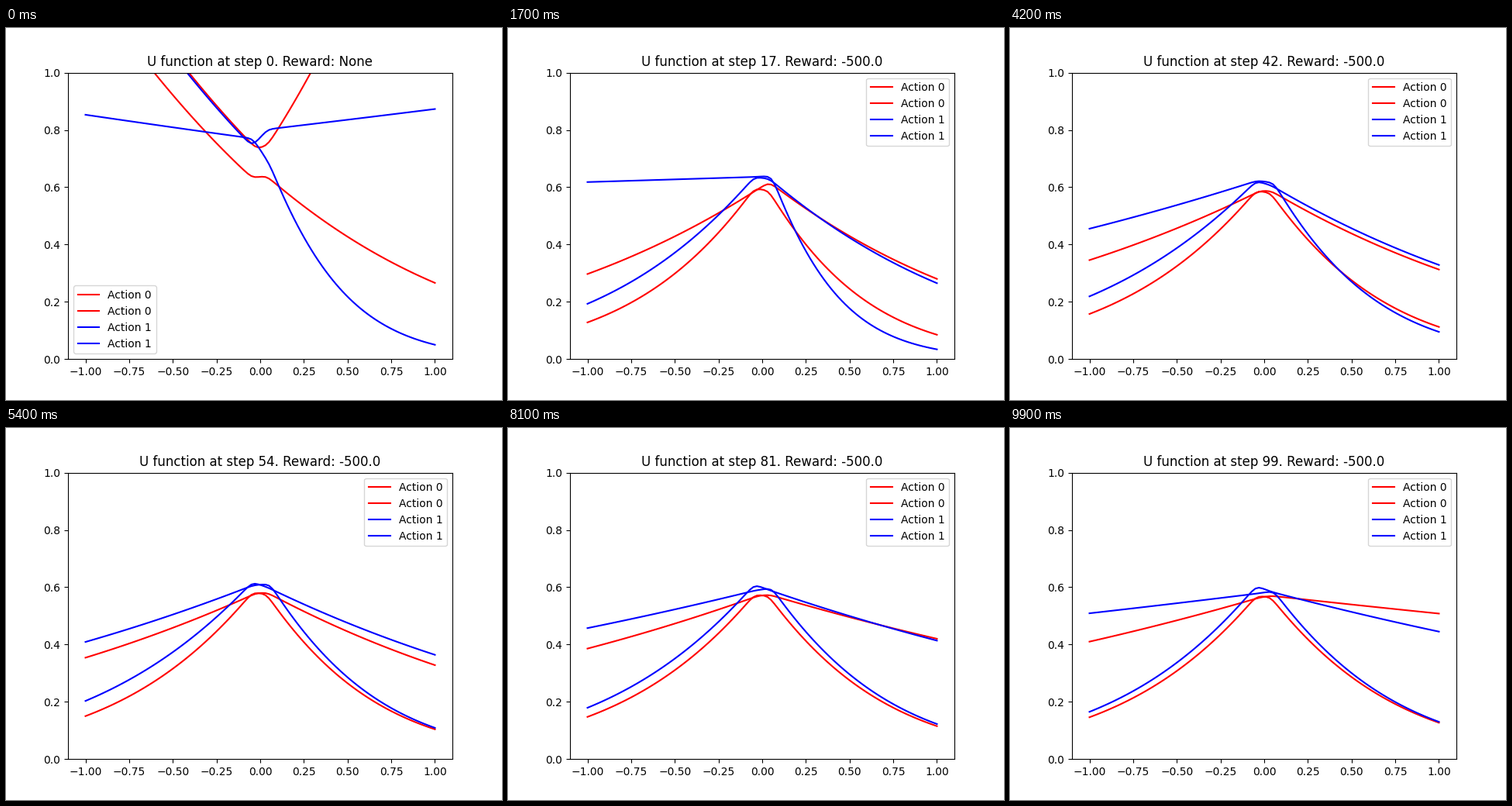
Animation, 640 px wide and 480 px high, one loop 10 s. Source, as a matplotlib script:

```python
import numpy as np
import matplotlib.pyplot as plt
from matplotlib.animation import FuncAnimation

FRAMES = 100
POSE_STEPS = [0, 17, 27, 54, 99]
DIP_STEP = 8      # early training overshoots until here, then recovers
ROUNDING = 0.012  # softness of the corners

x = np.linspace(-1, 1, 100)

# Each curve is a bent line under a softplus: two corner positions, then per
# pose the heights at x = -1, at both corners and at x = 1.
CURVES = [
    ("Action 0", "r", (-.045, .035),
     [(1.32, .632, .64, .266), (.128, .596, .59, .085), (.167, .595, .587, .125),
      (.15, .582, .577, .104), (.146, .569, .567, .127)]),
    ("Action 0", "r", (-.02, .04),
     [(1.5, .733, .745, 1.95), (.297, .595, .618, .28), (.333, .596, .599, .297),
      (.354, .58, .581, .328), (.41, .565, .57, .508)]),
    ("Action 1", "b", (-.04, .055),
     [(.853, .77, .68, .05), (.618, .636, .64, .034), (.566, .638, .622, .068),
      (.409, .607, .612, .109), (.509, .578, .587, .13)]),
    ("Action 1", "b", (-.045, .04),
     [(1.49, .742, .802, .873), (.193, .636, .63, .265), (.233, .629, .617, .284),
      (.203, .618, .6, .364), (.165, .605, .584, .445)]),
]


def softplus(z):
    return np.logaddexp(0, z)


def inverse(y):
    return np.log(np.expm1(y))


def ease(t, z):
    """Smooth values for every step; flat wherever a value turns around."""
    d = np.diff(z, axis=0) / np.diff(t)[:, None]
    a, b = d[:-1], d[1:]
    same = a * b > 0
    inner = np.where(same, 2 * a * b / np.where(same, a + b, 1), 0)
    m = np.vstack([d[:1], inner, d[-1:]])

    step = np.arange(FRAMES)
    i = np.clip(np.searchsorted(t, step, side="right") - 1, 0, len(t) - 2)
    h = (t[i + 1] - t[i])[:, None]
    s = (step - t[i])[:, None] / h
    return ((1 + 2 * s) * (1 - s) ** 2 * z[i] + s * s * (3 - 2 * s) * z[i + 1]
            + h * s * (1 - s) ** 2 * m[i] + h * s * s * (s - 1) * m[i + 1])


def bend(k):
    """Rounded hinge: zero left of k, slope one right of it."""
    return ROUNDING * softplus((x - k) / ROUNDING)


def track(corners, poses):
    """Curve heights, one row per step."""
    z = inverse(np.array(poses))
    dip = z[1] - 2 * (z[2] - z[1])
    t = np.insert(np.array(POSE_STEPS, float), 1, DIP_STEP)
    z = ease(t, np.insert(z, 1, dip, axis=0))

    a, b = corners
    s1, s2, s3 = (np.diff(z, axis=1) / np.diff([-1, a, b, 1])).T[:, :, None]
    line = z[:, :1] + s1 * (x + 1) + (s2 - s1) * bend(a) + (s3 - s2) * bend(b)
    return softplus(line)


fig, ax = plt.subplots(figsize=(6.4, 4.8), dpi=100)
tracks, lines = [], []
for label, color, corners, poses in CURVES:
    tracks.append(track(corners, poses))
    lines += ax.plot(x, tracks[-1][0], color, label=label)
ax.set_xlim(-1.1, 1.1)
ax.set_ylim(0, 1)
ax.legend(loc="best")
title = ax.set_title("")


def update(step):
    for line, heights in zip(lines, tracks):
        line.set_ydata(heights[step])
    reward = "-500.0" if step else "None"
    title.set_text(f"U function at step {step}. Reward: {reward}")
    return [*lines, title]


anim = FuncAnimation(fig, update, frames=FRAMES, interval=100, repeat=True)
plt.show()
```
